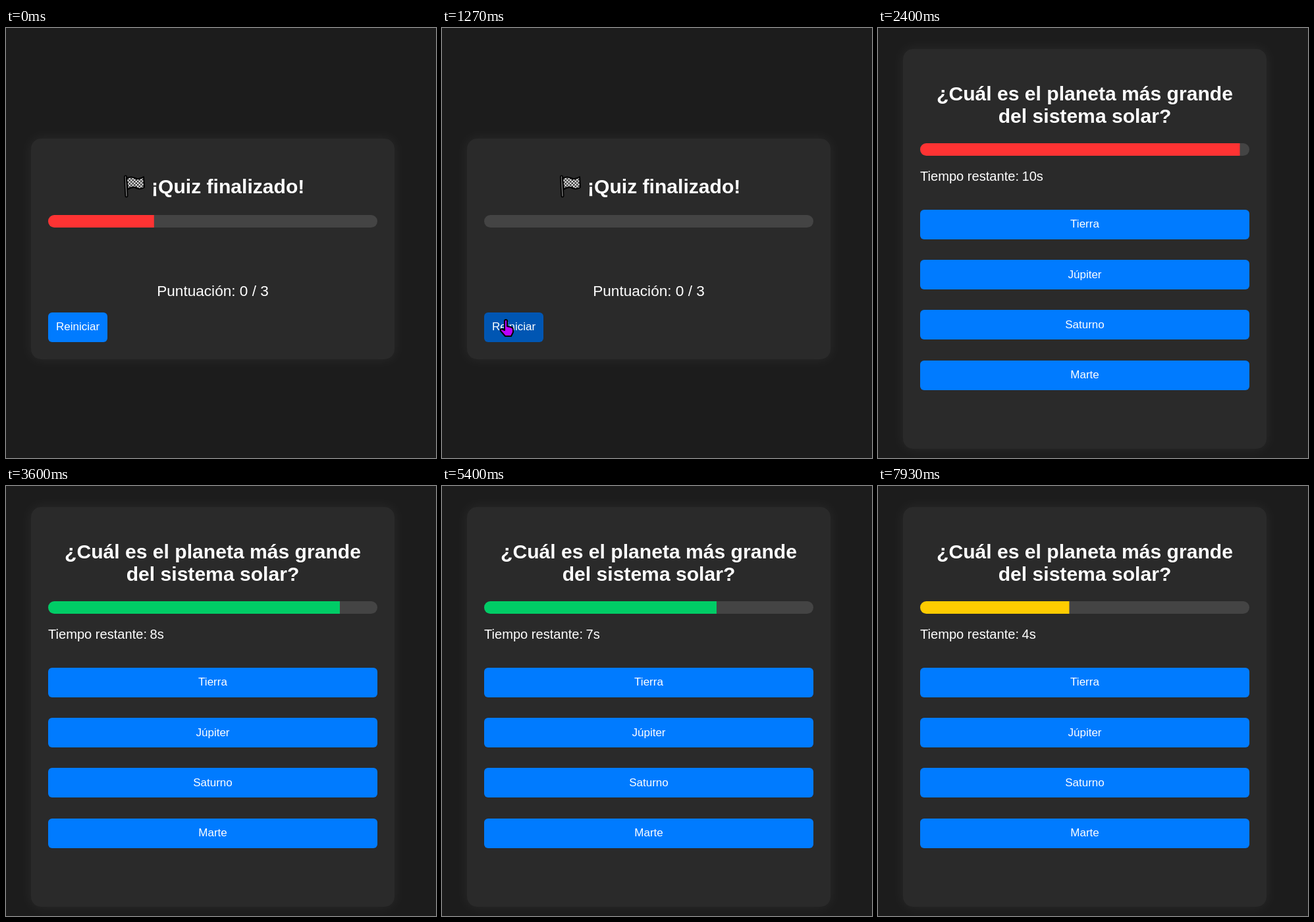
Write an HTML page that moves like this. It is 653x653 px and loops after 8000 ms.

```html
<!DOCTYPE html>
<html lang="es">
<head>
<meta charset="utf-8">
<title>Quiz</title>
<style>
  html, body { margin: 0; width: 100%; height: 100%; overflow: hidden; background: #1c1c1c; }
  svg { display: block; }
  #stage { width: 100vw; height: 100vh; }
  text { font-family: "Liberation Sans", Arial, sans-serif; fill: #fff; }
  .title { font-size: 30.1px; font-weight: bold; }
  .time { font-size: 20.1px; }
  .score { font-size: 22.6px; }
  .label { font-size: 17px; }
  .mid { text-anchor: middle; }
  .card { fill: #2a2a2a; filter: drop-shadow(0 0 10px rgba(255, 255, 255, .06)); }
  .track { fill: #444; }
  .button { fill: #007bff; }
  .fill { fill: #f33; transform-origin: 64px 0; }

  /* 1% of the loop is 80 ms */
  .anim { animation: 8s linear infinite; }
  .step { animation: 8s step-end infinite; }
  #result { animation-name: result; }
  #question { animation-name: question; }
  #drain { animation-name: drain; }
  #countdown { animation-name: countdown; }
  #tint { animation-name: tint; }
  #reel { animation-name: reel; }
  #restart { animation-name: restart; }
  #saturn { animation-name: saturn; }
  #pointer { animation-name: move; }
  #shown { animation-name: shown; }
  #arrow { animation-name: arrow; }
  #hand { animation-name: hand; }

  @keyframes result { 0% { visibility: visible } 18.28%, 100% { visibility: hidden } }
  @keyframes question { 0% { visibility: hidden } 18.28%, 100% { visibility: visible } }
  @keyframes drain { 0% { transform: scaleX(.322) } 9.94%, 100% { transform: scaleX(0) } }
  @keyframes countdown {
    0%, 17.875% { transform: scaleX(0) }
    30.375%, 30.75% { transform: scaleX(1) }
    100% { transform: scaleX(.446) }
  }
  @keyframes tint { 0% { fill: #f33 } 30.75% { fill: #0c6 } 68.25%, 100% { fill: #fc0 } }
  @keyframes reel {
    0% { transform: translateY(0) }
    30.75% { transform: translateY(-40px) }
    43.25% { transform: translateY(-80px) }
    55.75% { transform: translateY(-120px) }
    68.25% { transform: translateY(-160px) }
    80.75% { transform: translateY(-200px) }
    93.25%, 100% { transform: translateY(-240px) }
  }
  @keyframes restart { 0% { fill: #007bff } 14.94%, 100% { fill: #0056b3 } }
  @keyframes saturn { 0% { fill: #0056b3 } 19.7%, 100% { fill: #007bff } }
  @keyframes move {
    0%, 11.66% { transform: translate(578px, 634px) }
    12.5% { transform: translate(430px, 575px) }
    13.33% { transform: translate(290px, 520px) }
    14.17% { transform: translate(180px, 485px) }
    15% { transform: translate(120px, 458px) }
    15.83%, 18.28% { transform: translate(97px, 443px) }
    19.17% { transform: translate(82px, 445px) }
    20% { transform: translate(48px, 444px) }
    20.83%, 100% { transform: translate(18px, 436px) }
  }
  @keyframes shown { 0% { opacity: 0 } 11.56% { opacity: 1 } 21.56%, 100% { opacity: 0 } }
  @keyframes arrow { 0% { opacity: 1 } 14.94% { opacity: 0 } 19.7%, 100% { opacity: 1 } }
  @keyframes hand { 0% { opacity: 0 } 14.94% { opacity: 1 } 19.7%, 100% { opacity: 0 } }
</style>
</head>
<body>
<svg id="stage" viewBox="0 0 653 653">
  <defs>
    <clipPath id="high"><rect x="64" y="175" width="500" height="19" rx="9.5"/></clipPath>
    <clipPath id="low"><rect x="64" y="284" width="500" height="19" rx="9.5"/></clipPath>
    <pattern id="checks" width="5" height="5" patternUnits="userSpaceOnUse" patternTransform="translate(184 228) skewY(-4)">
      <rect width="5" height="5" fill="#e8e8e8"/>
      <path d="M0 0h2.5v5h2.5v-2.5h-5z" fill="#333"/>
    </pattern>
  </defs>

  <g id="result" class="step">
    <rect class="card" x="38" y="168" width="552" height="335" rx="15"/>
    <g stroke="#000" stroke-linejoin="round" stroke-linecap="round">
      <path d="M181.500 226L183 255" stroke-width="5"/>
      <path d="M181.500 226L183 255" stroke="#777" stroke-width="1.500"/>
      <path d="M183 228q7-3 13 0t13-2l1 16q-6 4-12 1t-13 2z" fill="url(#checks)" stroke-width="2"/>
    </g>
    <text class="title" x="221" y="251">¡Quiz finalizado!</text>
    <g clip-path="url(#low)">
      <rect class="track" x="64" y="284" width="500" height="19"/>
      <rect id="drain" class="fill anim" x="64" y="284" width="500" height="19"/>
    </g>
    <text class="score mid" x="314" y="407">Puntuación: 0 / 3</text>
    <rect id="restart" class="button step" x="64" y="432" width="90" height="45" rx="6"/>
    <text class="label mid" x="109" y="459">Reiniciar</text>
  </g>

  <g id="question" class="step">
    <rect class="card" x="38" y="32" width="552" height="607" rx="15"/>
    <text class="title mid" x="314" y="110">¿Cuál es el planeta más grande</text>
    <text class="title mid" x="314" y="144">del sistema solar?</text>
    <g clip-path="url(#high)">
      <rect class="track" x="64" y="175" width="500" height="19"/>
      <g id="countdown" class="fill anim">
        <rect id="tint" class="step" x="64" y="175" width="500" height="19"/>
      </g>
    </g>
    <text class="time" x="64" y="232">Tiempo restante:</text>
    <svg x="218" y="210" width="60" height="30" overflow="hidden">
      <g id="reel" class="step time">
        <text x="0.500" y="22">10s</text>
        <text x="0.500" y="62">9s</text>
        <text x="0.500" y="102">8s</text>
        <text x="0.500" y="142">7s</text>
        <text x="0.500" y="182">6s</text>
        <text x="0.500" y="222">5s</text>
        <text x="0.500" y="262">4s</text>
      </g>
    </svg>
    <g class="label mid">
      <rect class="button" x="64" y="276" width="500" height="45" rx="6"/>
      <text x="314" y="303">Tierra</text>
      <rect class="button" x="64" y="352" width="500" height="45" rx="6"/>
      <text x="314" y="380">Júpiter</text>
      <rect id="saturn" class="button step" x="64" y="428" width="500" height="45" rx="6"/>
      <text x="314" y="456">Saturno</text>
      <rect class="button" x="64" y="505" width="500" height="45" rx="6"/>
      <text x="314" y="532">Marte</text>
    </g>
  </g>

  <g id="shown" class="step">
    <g id="pointer" class="anim" fill="#b0f" stroke="#000" stroke-width="2" stroke-linejoin="round">
      <path id="arrow" class="step" d="M1 1V21l4.500-4 3.500 6 3-1.500-3-6h5.500z"/>
      <path id="hand" class="step" d="M-2 1q2-2 4 0v9l5 1q4 1 4 4v4l-3 6h-9l-7-8q-1-3 2-3l4 2z"/>
    </g>
  </g>
</svg>
</body>
</html>
```
